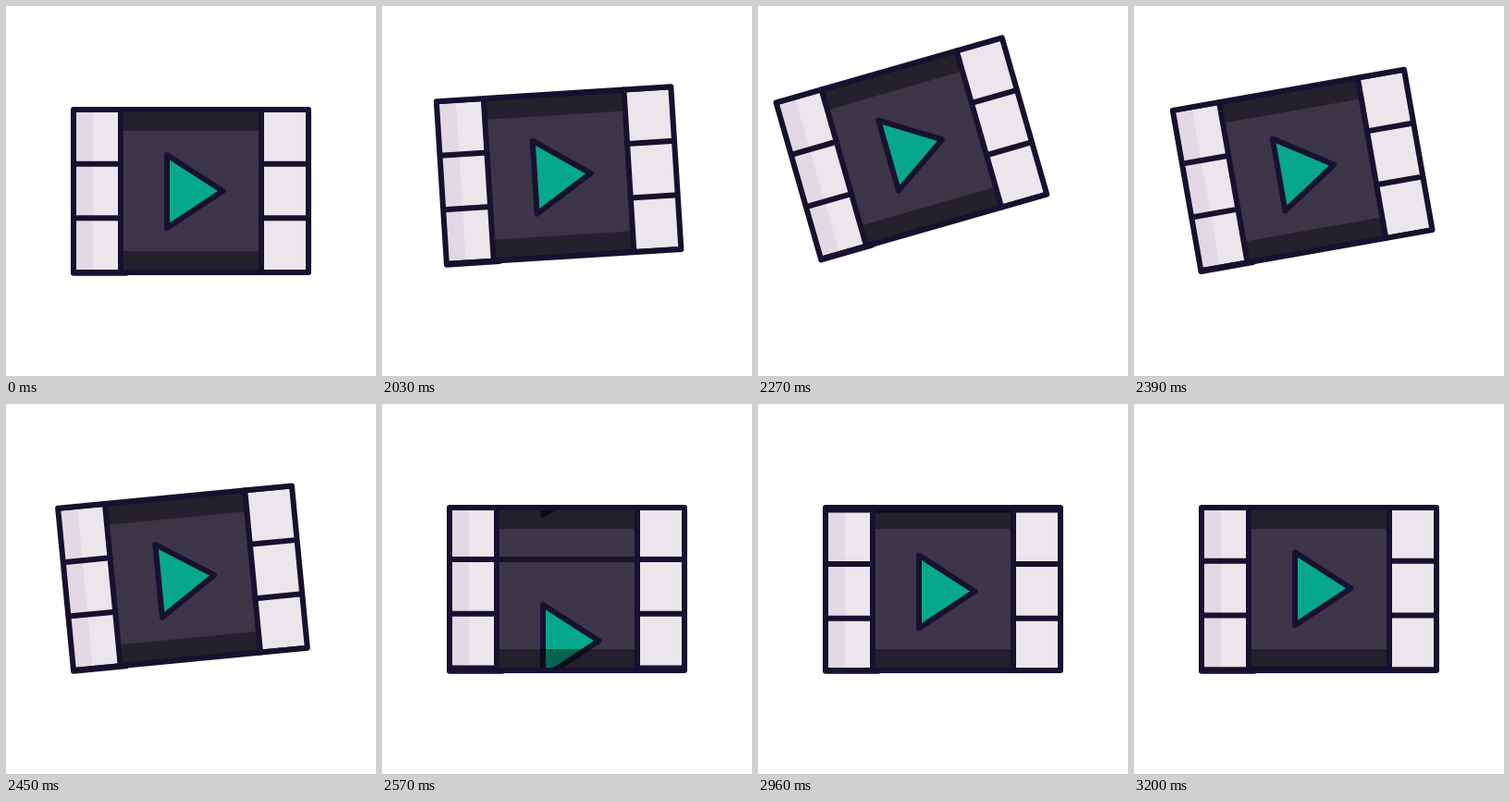
Write an HTML page with a canvas that moves like this. It is 400 px wide and 400 px high and loops after 3290 ms.

```html
<!DOCTYPE html>
<html lang="en">
<head>
<meta charset="utf-8">
<title>Film strip</title>
<style>
  html, body { margin: 0; width: 100%; height: 100%; overflow: hidden; background: #fff; }
  canvas { display: block; width: 400px; height: 400px; }
</style>
</head>
<body>
<canvas id="stage" width="400" height="400"></canvas>
<script>
const ctx = document.getElementById('stage').getContext('2d');

const LOOP = 3290, START = 2000, STEP = 30, LAST_STEP = 40;
const LEFT = 73, RIGHT = 327, TOP = 112, BOTTOM = 288;
const INNER_LEFT = 124, INNER_RIGHT = 276;
const PERIOD = BOTTOM - TOP;
const INK = '#16112f', CELL = '#ebe5ec', CELL_SHADE = '#e2d9e4';
const FILM = '#3c3547', TEAL = '#07a78a', SHADOW = 'rgba(0,0,0,0.4)';

const clamp01 = v => Math.min(1, Math.max(0, v));
const progress = (n, from, to) => clamp01((n - from) / (to - from));
const easeSine = u => (1 - Math.cos(Math.PI * u)) / 2;
const easeCubic = u => u < 0.5 ? 4 * u ** 3 : 1 - 4 * (1 - u) ** 3;

// Tilt in degrees: quick swing up, then an accelerating fall.
function tilt(n) {
  return n < 5 ? 3.6 * n : 18 * (1 - progress(n, 5, 17) ** 2);
}

// Height of the lower left corner above its resting place.
function lift(n) {
  return n < 4.5
    ? 23.2 * (1 - (1 - n / 4.5) ** 2)
    : 23.2 * (1 - progress(n, 4.5, 13.5) ** 1.4);
}

// Distance the film has run: one picture, a small overshoot, a slow return.
function scroll(n) {
  const peak = PERIOD + 5.6;
  return n < 24
    ? peak * easeSine(progress(n, 16, 24))
    : peak - 6.4 * easeCubic(progress(n, 24, 40));
}

function rect(x1, y1, x2, y2, color) {
  ctx.fillStyle = color;
  ctx.fillRect(x1, y1, x2 - x1, y2 - y1);
}

function line(x1, y1, x2, y2) {
  ctx.beginPath();
  ctx.moveTo(x1, y1);
  ctx.lineTo(x2, y2);
  ctx.stroke();
}

function playSign(y) {
  ctx.beginPath();
  ctx.moveTo(174, y + 49);
  ctx.lineTo(234.5, y + 88);
  ctx.lineTo(174, y + 128);
  ctx.closePath();
  ctx.fillStyle = TEAL;
  ctx.fill();
  ctx.stroke();
}

function picture(y) {
  playSign(y);
  line(INNER_LEFT, y, INNER_RIGHT, y);
  for (let i = 0; i < 3; i++) {
    const cellY = y + i * PERIOD / 3;
    line(LEFT, cellY, INNER_LEFT, cellY);
    line(INNER_RIGHT, cellY, RIGHT, cellY);
  }
}

function film(offset) {
  ctx.save();
  ctx.beginPath();
  ctx.rect(LEFT, TOP, RIGHT - LEFT, PERIOD);
  ctx.clip();
  rect(LEFT, TOP, RIGHT, BOTTOM, CELL);
  rect(LEFT, TOP, 94, BOTTOM, CELL_SHADE);
  rect(INNER_LEFT, TOP, INNER_RIGHT, BOTTOM, FILM);
  const first = TOP + offset % PERIOD;
  for (let k = -1; k <= 1; k++) picture(first + k * PERIOD);
  rect(INNER_LEFT, TOP, INNER_RIGHT, 135, SHADOW);
  rect(INNER_LEFT, 265, INNER_RIGHT, BOTTOM, SHADOW);
  ctx.restore();
}

function frame() {
  ctx.strokeRect(LEFT, TOP, RIGHT - LEFT, PERIOD);
  line(INNER_LEFT, TOP, INNER_LEFT, BOTTOM);
  line(INNER_RIGHT, TOP, INNER_RIGHT, BOTTOM);
  line(LEFT, BOTTOM + 0.8, 130, BOTTOM + 0.8);
}

function draw(time) {
  const n = Math.min(LAST_STEP, Math.max(0, Math.floor((time - START) / STEP)));
  const rise = lift(n);
  ctx.setTransform(1, 0, 0, 1, 0, 0);
  rect(0, 0, 400, 400, '#fff');
  ctx.translate(LEFT - 0.34 * rise, BOTTOM - rise);
  ctx.rotate(-tilt(n) * Math.PI / 180);
  ctx.translate(-LEFT, -BOTTOM);
  ctx.lineWidth = 6;
  ctx.lineJoin = ctx.lineCap = 'round';
  ctx.strokeStyle = INK;
  film(scroll(n));
  frame();
}

const begin = performance.now();
function tick() {
  draw((performance.now() - begin) % LOOP);
  requestAnimationFrame(tick);
}
tick();
</script>
</body>
</html>
```
